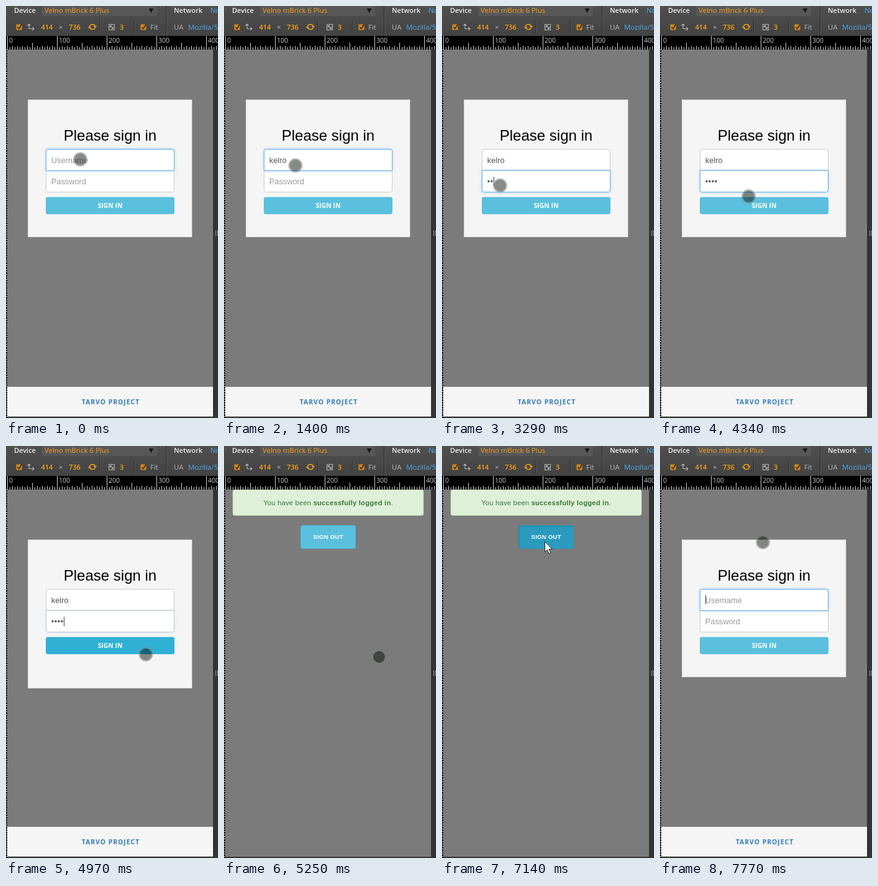
Recreate the animation shown at these times as an HTML page. Size 341 by 661 pixels, loop 8000 ms.

```html
<!DOCTYPE html>
<html lang="en">
<head>
<meta charset="utf-8">
<title>Sign in demo</title>
<style>
  html, body { margin: 0; width: 100%; height: 100%; overflow: hidden; background: #333; }
  svg { display: block; }
  text { font-family: "Liberation Sans", Arial, sans-serif; white-space: pre; }
  .ui text { font: 11.400px "Open Sans", sans-serif; }
  .ui .strong { font-weight: 600; font-size: 11px; }
  .ui .orange { fill: #f9a11b; }
  .ui .grey { fill: #b4b4b4; }
  .ui .blue { fill: #4fa8ee; }
  .mid { text-anchor: middle; }
  .caps { font: bold 10.4px "Open Sans", sans-serif; }
  .field { font-size: 12.8px; }
  .hint { fill: #999; }
  .value { fill: #555; }
</style>
</head>
<body>
<svg width="341" height="661" viewBox="0 0 341 661">
  <defs>
    <linearGradient id="bar" x2="0" y2="1"><stop stop-color="#505050"/><stop offset="1" stop-color="#424242"/></linearGradient>
    <filter id="blur" x="-10%" y="-50%" width="120%" height="200%"><feGaussianBlur stdDeviation="2.4"/></filter>
    <path id="top" d="M64.5 264V233q0-3 3-3h200q3 0 3 3v31z"/>
    <path id="bottom" d="M64.5 264h206v31.5q0 3-3 3h-200q-3 0-3-3z"/>
    <g id="check">
      <rect x=".5" y="1" width="9" height="9" rx="1" fill="#c98a25" stroke="#9c6a18"/>
      <path d="M2.500 5.500l2.300 2.500 4.500-7" fill="none" stroke="#33281a" stroke-width="1.600"/>
    </g>
  </defs>

  <rect width="341" height="661" fill="#333"/>
  <rect x="2" y="70" width="331" height="589" fill="#7b7b7b"/>

  <g id="login">
    <rect id="card" x="35.500" y="150.500" width="263.500" fill="#f5f5f5" stroke="#e6e6e6" stroke-width=".6"/>
    <text class="mid" x="167.500" y="216" font-size="24">Please sign in</text>
    <g fill="#fff" stroke="#ccc"><use href="#top"/><use href="#bottom"/></g>
    <g id="userFocus">
      <use href="#top" fill="#66afe9" opacity=".65" filter="url(#blur)"/>
      <use href="#top" fill="#fff" stroke="#66afe9"/>
    </g>
    <g id="passFocus">
      <use href="#bottom" fill="#66afe9" opacity=".65" filter="url(#blur)"/>
      <use href="#bottom" fill="#fff" stroke="#66afe9"/>
    </g>
    <text id="user" class="field" x="72.800" y="252"></text>
    <text id="pass" class="field" x="72.800" y="286"></text>
    <rect id="caret" width="1" height="15" fill="#444"/>
    <rect id="signIn" x="64" y="306.500" width="207" height="27.500" rx="3"/>
    <text class="mid caps" x="167.500" y="324" fill="#fff">SIGN IN</text>
    <rect x="2" y="611" width="331" height="47.500" fill="#f5f5f5"/>
    <text class="mid caps" x="168.500" y="639" fill="#337ab7" letter-spacing="1">TARVO PROJECT</text>
  </g>

  <g id="welcome">
    <rect x="14.300" y="70.300" width="306.400" height="41" rx="3" fill="#dff0d8" stroke="#d6e9c6" stroke-width=".8"/>
    <text class="mid" x="167.500" y="95" font-size="11.200" letter-spacing=".22" fill="#3c763d">You have been <tspan font-weight="bold">successfully logged in</tspan>.</text>
    <rect id="signOut" x="123.500" y="127.500" width="88" height="37" rx="2.500" stroke-width=".8"/>
    <path id="inset" d="M124.500 163v-34h86" fill="none" stroke="#1c7896" stroke-width="1.500" opacity=".4"/>
    <text class="mid" x="167.700" y="149.300" font-size="9.600" font-weight="bold" letter-spacing=".24" fill="#fff">SIGN OUT</text>
  </g>

  <g id="touch">
    <circle r="10.400" fill="none" stroke="#7b7b7b" stroke-width="2" stroke-opacity=".55"/>
    <circle r="9.400" fill="#000800" fill-opacity=".47"/>
  </g>
  <path id="arrow" d="M165.500 153.500v16.500l3.800-3.600 2.700 6.200 2.700-1.200-2.700-6h5.200z" fill="#fff" stroke="#222"/>

  <g class="ui">
    <rect width="341" height="48" fill="url(#bar)"/>
    <rect x="58" width="185" height="16" rx="1" fill="#575757"/>
    <path d="M229.500 4h8l-4 7z" fill="#161616"/>
    <path d="M257.500 0v48M150.500 23v21M206.500 23v21" stroke="#2c2c2c"/>
    <path d="M258.500 0v48M151.500 23v21M207.500 23v21" stroke="#5a5a5a"/>
    <text class="strong" x="13" y="11" fill="#eee">Device</text>
    <text class="orange" x="62" y="11">Velno mBrick 6 Plus</text>
    <text class="strong" x="270" y="11" fill="#eee">Network</text>
    <text class="blue" x="329" y="11">No</text>
    <use href="#check" x="16" y="28.500"/>
    <g fill="none" stroke="#b4b4b4" stroke-width="1.100">
      <path d="M37 29v7.500h8M34.500 31.500l2.500-2.500 2.500 2.500M42.500 34l2.500 2.500-2.500 2.500"/>
      <path d="M165.500 29.500h9v9h-9zM168 32l4 4M167.500 34.500v-3h3M172.500 33.500v3h-3"/>
    </g>
    <g fill="none" stroke="#f9a11b" stroke-width="1.500">
      <path d="M134.500 32a5 4.500 0 0 1 9 0M143.500 35a5 4.500 0 0 1-9 0"/>
      <path d="M141 32.500h5l-2.500 2zM132 34.500h5l-2.500-2z" fill="#f9a11b" stroke-width=".6"/>
    </g>
    <text class="orange strong" x="56.500" y="38">414</text>
    <text class="grey" x="85" y="38">×</text>
    <text class="orange strong" x="101" y="38">736</text>
    <text class="orange strong" x="183" y="38">3</text>
    <use href="#check" x="216" y="28.500"/>
    <text class="grey" x="232" y="38">Fit</text>
    <text class="grey" x="270" y="38">UA</text>
    <text class="blue" x="293" y="38">Mozilla/5</text>
    <path d="M0 48h341v22H2v591H0z" fill="#000"/>
    <path id="ticks" stroke="#d0d0d0" fill="none"/>
    <g id="labels" fill="#ccc"></g>
    <path d="M337.500 360v9M340.500 360v9" stroke="#999"/>
  </g>
</svg>
<script>
const $ = id => document.getElementById(id);
const LOOP = 8000, STEP = 70;
const NAME = 'kelro', NAME_KEYS = [280, 490, 560, 700, 910];
const PASS_KEYS = [2870, 3290, 3570, 3850];
const CARET_RESETS = [...NAME_KEYS, 2380, ...PASS_KEYS, 7630];
const LOGGED_IN = 5250, PRESSED = 7140, LOGGED_OUT = 7490;

// time, x, y of the touch point
const TOUCH = [
  [0, 119.5, 246], [1330, 119.5, 246], [1680, 96.5, 294.5], [1820, 96.5, 294.5],
  [2030, 93.5, 288], [4130, 93.5, 288], [4340, 142.5, 305.5], [4410, 142.5, 305.5],
  [4690, 151.5, 321.5], [4760, 151.5, 321.5], [5040, 249.5, 338.5], [5670, 249.5, 338.5],
  [5950, 205, 220], [6160, 172, 113], [6230, 166, 102], [6300, 172, 112],
  [6440, 181, 148], [6510, 176.5, 157], [6790, 165.5, 154.3], [LOOP, 165.5, 154.3]
];

const ramp = (t, from, to) => Math.min(1, Math.max(0, (t - from) / (to - from)));
const typed = (keys, t) => keys.filter(k => k <= t).length;
const show = (id, on) => $(id).style.display = on ? '' : 'none';

function touchAt(t) {
  const i = TOUCH.findIndex(k => k[0] > t);
  const [t0, x0, y0] = TOUCH[i - 1], [t1, x1, y1] = TOUCH[i];
  const p = ramp(t, t0, t1);
  return [x0 + (x1 - x0) * p, y0 + (y1 - y0) * p];
}

function buildRuler() {
  let d = '';
  for (let u = 0; u < 425; u += 5) {
    const top = u % 100 === 0 ? 48 : u % 50 === 0 ? 59 : u % 10 === 0 ? 64 : 66;
    d += `M${2.5 + u * .8} ${top}V70`;
  }
  for (let y = 70.5; y < 661; y += 4) d += `M0 ${y}h2`;
  $('ticks').setAttribute('d', d);
  $('labels').innerHTML = [0, 100, 200, 300, 400]
    .map(u => `<text x="${5 + u * .8}" y="59" style="font-size:10.5px">${u}</text>`).join('');
}

function setField(id, value, hint) {
  $(id).textContent = value || hint;
  $(id).setAttribute('class', 'field ' + (value ? 'value' : 'hint'));
  $(id).setAttribute('letter-spacing', id === 'pass' && value ? .5 : 0);
}

function placeCaret(t, id, value) {
  const last = CARET_RESETS.filter(k => k <= t).pop();
  const width = value ? $(id).getComputedTextLength() : 0;
  $('caret').setAttribute('x', Math.round(72.8 + width));
  $('caret').setAttribute('y', id === 'user' ? 239 : 274);
  show('caret', last !== undefined && (t - last) % 980 < 490 && (t < 2240 || t >= 2380)
    && (t < LOGGED_IN || t >= 7630));
}

function drawLogin(t) {
  const fresh = t >= LOGGED_OUT;
  const name = fresh ? '' : NAME.slice(0, typed(NAME_KEYS, t));
  const secret = fresh ? '' : '•'.repeat(typed(PASS_KEYS, t));
  setField('user', name, 'Username');
  setField('pass', secret, 'Password');
  $('userFocus').setAttribute('opacity', fresh ? ramp(t, 7560, 7770) : 1 - ramp(t, 2170, 2380));
  $('passFocus').setAttribute('opacity', fresh ? 0 : ramp(t, 2170, 2380) - ramp(t, 4760, 5040));
  const onUser = fresh || t < 2240;
  placeCaret(t, onUser ? 'user' : 'pass', onUser ? name : secret);
  $('card').setAttribute('height', 220 + (fresh ? 0 : 24 * ramp(t, 4760, 5040)));
  $('signIn').setAttribute('fill', !fresh && t >= 4830 ? '#31b0d5' : '#5bc0de');
}

function drawWelcome(pressed) {
  $('signOut').setAttribute('fill', pressed ? '#2a9bbf' : '#5bc0de');
  $('signOut').setAttribute('stroke', pressed ? '#2a93b5' : '#50bbdb');
  show('inset', pressed);
}

function draw(now) {
  const t = Math.floor(now % LOOP / STEP) * STEP;
  const inside = t >= LOGGED_IN && t < LOGGED_OUT;
  const pressed = inside && t >= PRESSED;
  show('login', !inside);
  show('welcome', inside);
  inside ? drawWelcome(pressed) : drawLogin(t);
  show('arrow', pressed);
  show('touch', !pressed);
  $('touch').setAttribute('transform', `translate(${touchAt(t)})`);
}

buildRuler();
let start;
function tick(now) {
  start ??= now;
  draw(now - start);
  requestAnimationFrame(tick);
}
draw(0);
requestAnimationFrame(tick);
</script>
</body>
</html>
```
